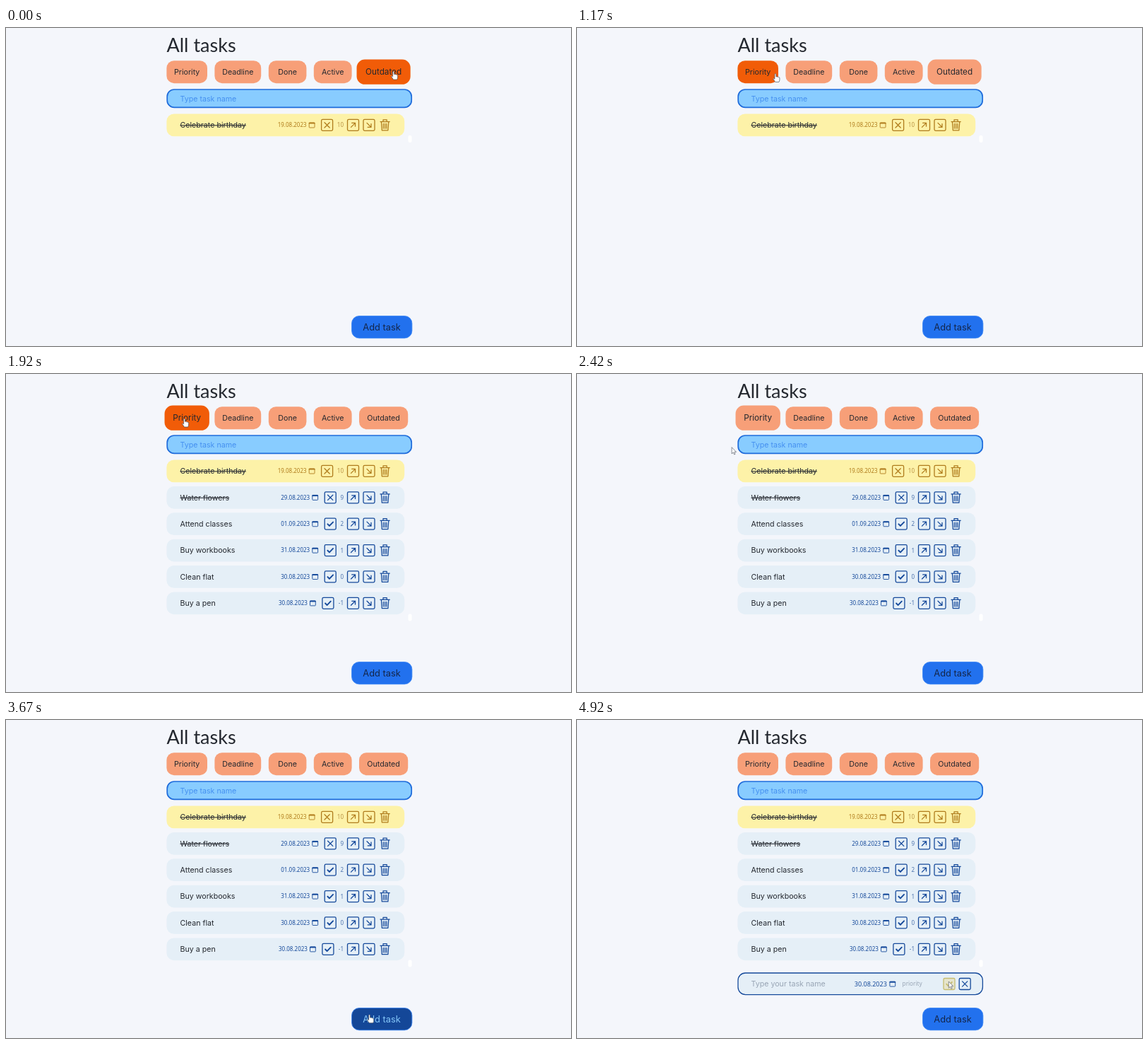
Animation of 800x450 px, one loop 5010 ms. Source, as an HTML page:

```html
<!DOCTYPE html>
<html lang="en">
<head>
<meta charset="utf-8">
<title>All tasks</title>
<style>
  html, body { margin: 0; width: 100%; height: 100%; overflow: hidden; background: #f4f6fb; }
  svg { display: block; width: 100%; height: 100%; }
  text { font-family: Inter, sans-serif; font-size: 10.67px; fill: #24282f; }
  .title { font-family: Lato, sans-serif; font-size: 27px; }
  .small { font-family: "Noto Sans", sans-serif; font-size: 8px; }
  .mid { text-anchor: middle; }
  .end { text-anchor: end; }
</style>
</head>
<body>
<svg id="stage" viewBox="0 0 800 450">
  <rect width="800" height="450" fill="#f4f6fb"/>
  <text class="title" x="227.5" y="33.5">All tasks</text>
  <g id="filters"></g>
  <rect x="228.2" y="87" width="346" height="25.4" rx="10" fill="#88ccff" stroke="#1f6cdb" stroke-width="1.7"/>
  <text x="246.5" y="103.8" style="fill:#4590f0">Type task name</text>
  <g id="rows"></g>
  <rect id="thumb" x="569.5" width="5" height="10" rx="2" fill="#fff"/>
  <g id="form"></g>
  <rect id="addBox" x="489.5" y="407.5" width="85.4" height="31.4" rx="10.5" stroke="#3c87f5" stroke-width=".8"/>
  <text id="addText" class="mid" x="532" y="428" style="font-size:12.8px">Add task</text>
  <path id="arrow" d="M0 0V9.2L2.1 7.3 3.5 10.3 4.9 9.7 3.6 6.7H6.4Z" fill="#fff" stroke="#5b606b" stroke-width=".7" stroke-linejoin="round"/>
  <path id="hand" d="M-1 1Q0-.7 1 1V4.5Q2 3.8 2.8 4.8 3.8 4.2 4.5 5.2 5.8 4.9 6 6.3V9Q5.9 10.5 5 12H-.2Q-1.2 10.2-3.2 7.6-2.8 6.2-1 7.7Z" fill="#fff" stroke="#444a55" stroke-width=".7" stroke-linejoin="round"/>
</svg>
<script>
const $ = id => document.getElementById(id);
const LOOP = 5010, STEP = 83.5;
const NAVY = '#164a9b', GOLD = '#b07c1c', PALE = '#f79f78', HOT = '#f15c08';

// Icons, each centred on x, y
const line = (d, color, w = 1.3) =>
  `<path d="${d}" fill="none" stroke="${color}" stroke-width="${w}" stroke-linecap="round" stroke-linejoin="round"/>`;
const at = (x, y, body) => `<g transform="translate(${x} ${y})">${body}</g>`;
const marks = {
  cross: 'M-3.6-3.6 3.6 3.6M3.6-3.6-3.6 3.6',
  check: 'M-3.8.2-1.3 2.8 3.9-2.6',
  up: 'M-3 3 3-3M-1.8-3H3V1.8',
  down: 'M-3-3 3 3M-1.8 3H3V-1.8'
};
const box = (x, y, mark, color) => at(x, y,
  `<rect x="-8" y="-8" width="16" height="16" rx="1.8" fill="none" stroke="${color}" stroke-width="1.3"/>` +
  line(marks[mark], color, mark === 'check' ? 1.9 : 1.3));
const calendar = (x, y, color) => at(x, y,
  `<rect x="-3.9" y="-3.4" width="7.8" height="7" rx=".8" fill="none" stroke="${color}" stroke-width=".9"/>` +
  line('M-3.6-2.7H3.6', color, 1.7));
const trash = (x, y, color) => at(x, y,
  line('M-6.6-4.9H6.6M-2.6-5.2V-7.6H2.6V-5.2M-5.2-4.6-4.3 7.4H4.3L5.2-4.6M-2.3-2V4.8M0-2V4.8M2.3-2V4.8', color, 1.25));

const filters = [
  ['Priority', 227.4, 57.6], ['Deadline', 295.4, 65.8], ['Done', 371.8, 53.6],
  ['Active', 435.8, 53.8], ['Outdated', 500, 69.2]
];
$('filters').innerHTML = filters.map(([name, x, w]) =>
  `<g><rect x="${x}" y="46.2" width="${w}" height="32" rx="10.5"/>` +
  `<text class="mid" x="${x + w / 2}" y="66.1">${name}</text></g>`).join('');
const buttons = [...$('filters').children];

// name, date, priority, done, shift of the left-hand controls
const tasks = [
  ['Celebrate birthday', '19.08.2023', '10', true, -4.6],
  ['Water flowers', '29.08.2023', '9', true, 0],
  ['Attend classes', '01.09.2023', '2', false, 0],
  ['Buy workbooks', '31.08.2023', '1', false, 0],
  ['Clean flat', '30.08.2023', '0', false, 0],
  ['Buy a pen', '30.08.2023', '-1', false, -3.3]
];
$('rows').innerHTML = tasks.map(([name, date, rank, done, dx], i) => {
  const y = 137.4 + i * 37.38, color = i ? NAVY : GOLD;
  return `<g><rect x="227.4" y="${y - 15.9}" width="336.8" height="31.8" rx="10.5" fill="${i ? '#e5eff7' : '#fdf2a8'}"/>` +
    `<text x="246.5" y="${y + 3.8}"${done ? ' text-decoration="line-through"' : ''}>${name}</text>` +
    `<text class="small end" x="${430.2 + dx}" y="${y + 2.8}" style="fill:${color}">${date}</text>` +
    calendar(437.7 + dx, y, color) + box(459.2 + dx, y, done ? 'cross' : 'check', color) +
    `<text class="small end" x="478" y="${y + 3}" style="fill:${i ? '#4d74ae' : '#b99243'}">${rank}</text>` +
    box(491.5, y, 'up', color) + box(514, y, 'down', color) + trash(536.6, y, color) + '</g>';
}).join('');
const rows = [...$('rows').children];

$('form').innerHTML =
  '<rect x="228" y="358" width="346.4" height="30.6" rx="10.5" fill="#e5eff7" stroke="#164a9b" stroke-width="1.3"/>' +
  '<text x="246.5" y="377.1" style="fill:#98a5b5">Type your task name</text>' +
  '<path id="caret" d="M245.7 366.8V380" stroke="#24282f" stroke-width=".9"/>' +
  `<text class="small" x="392.8" y="376.6" style="font-size:9px;fill:${NAVY}">30.08.2023</text>` +
  calendar(446.8, 373.5, NAVY) +
  '<text class="small" x="460.6" y="376.2" style="font-size:8.2px;fill:#98a5b5">priority</text>' +
  `<g id="okIdle">${box(527, 373.5, 'check', NAVY)}</g>` +
  `<g id="okHot"><rect x="519" y="365.5" width="16" height="16" rx="1.8" fill="#e6e5cd"/>${box(527, 373.5, 'check', '#c6bd70')}</g>` +
  box(549.2, 373.5, 'cross', NAVY);

// Pointer stops: time, x, y
const path = [
  [0, 548.6, 61], [510, 548.6, 61], [750, 467, 69.5], [1080, 312, 66], [1250, 252.6, 63],
  [2250, 252.6, 63], [2420, 219.3, 103], [2750, 182, 250], [2920, 186.3, 269.3], [3000, 186.3, 269.3],
  [3420, 498, 387], [3670, 514.6, 416.8], [4420, 514.6, 416.8], [4750, 526.3, 370], [LOOP, 526.3, 370]
];
const clamp = v => Math.max(0, Math.min(1, v));
const ease = v => v * v * (3 - 2 * v);
const ramp = (t, a, b) => ease(clamp((t - a) / (b - a)));

function pointer(t) {
  let i = 1;
  while (i < path.length - 1 && path[i][0] < t) i++;
  const [a, ax, ay] = path[i - 1], [b, bx, by] = path[i];
  const k = clamp((t - a) / (b - a));
  return [ax + (bx - ax) * k, ay + (by - ay) * k];
}
const inside = (px, py, x, y, w, h) => px >= x && px <= x + w && py >= y && py <= y + h;
const show = (el, on) => el.setAttribute('visibility', on ? 'visible' : 'hidden');

function draw(t) {
  const [px, py] = pointer(t);
  const focus = [ramp(t, 1570, 1660) - ramp(t, 2640, 2760), 0, 0, 0, 1 - ramp(t, 1570, 1660)];
  let hot = false;
  filters.forEach(([, x, w], i) => {
    const over = inside(px, py, x, 46, w, 33), s = 1 + focus[i] * 0.1;
    const cx = x + w / 2, cy = 62.2;
    hot = hot || over;
    buttons[i].firstChild.setAttribute('fill', over ? HOT : PALE);
    buttons[i].setAttribute('transform', `translate(${cx} ${cy}) scale(${s}) translate(${-cx} ${-cy})`);
  });

  const all = t >= 1745, editing = t >= 4120;
  rows.forEach((row, i) => show(row, all || !i));
  $('thumb').setAttribute('y', all ? 339.5 : 152);

  const overAdd = inside(px, py, 489, 407, 86, 32);
  $('addBox').setAttribute('fill', overAdd ? '#144798' : '#2271ee');
  $('addText').style.fill = overAdd ? '#86c8fa' : '#14264a';

  const overOk = editing && inside(px, py, 518, 365, 18, 17);
  $('form').setAttribute('display', editing ? 'inline' : 'none');
  show($('caret'), t < 4660);
  show($('okIdle'), !overOk);
  show($('okHot'), overOk);

  hot = hot || overAdd;
  for (const id of ['arrow', 'hand']) {
    $(id).setAttribute('transform', `translate(${px} ${py})`);
    show($(id), (id === 'hand') === hot);
  }
}

const start = performance.now();
function tick() {
  const t = (performance.now() - start) % LOOP;
  draw(Math.min(59, Math.floor((t + 8) / STEP)) * STEP);
  requestAnimationFrame(tick);
}
tick();
</script>
</body>
</html>
```
